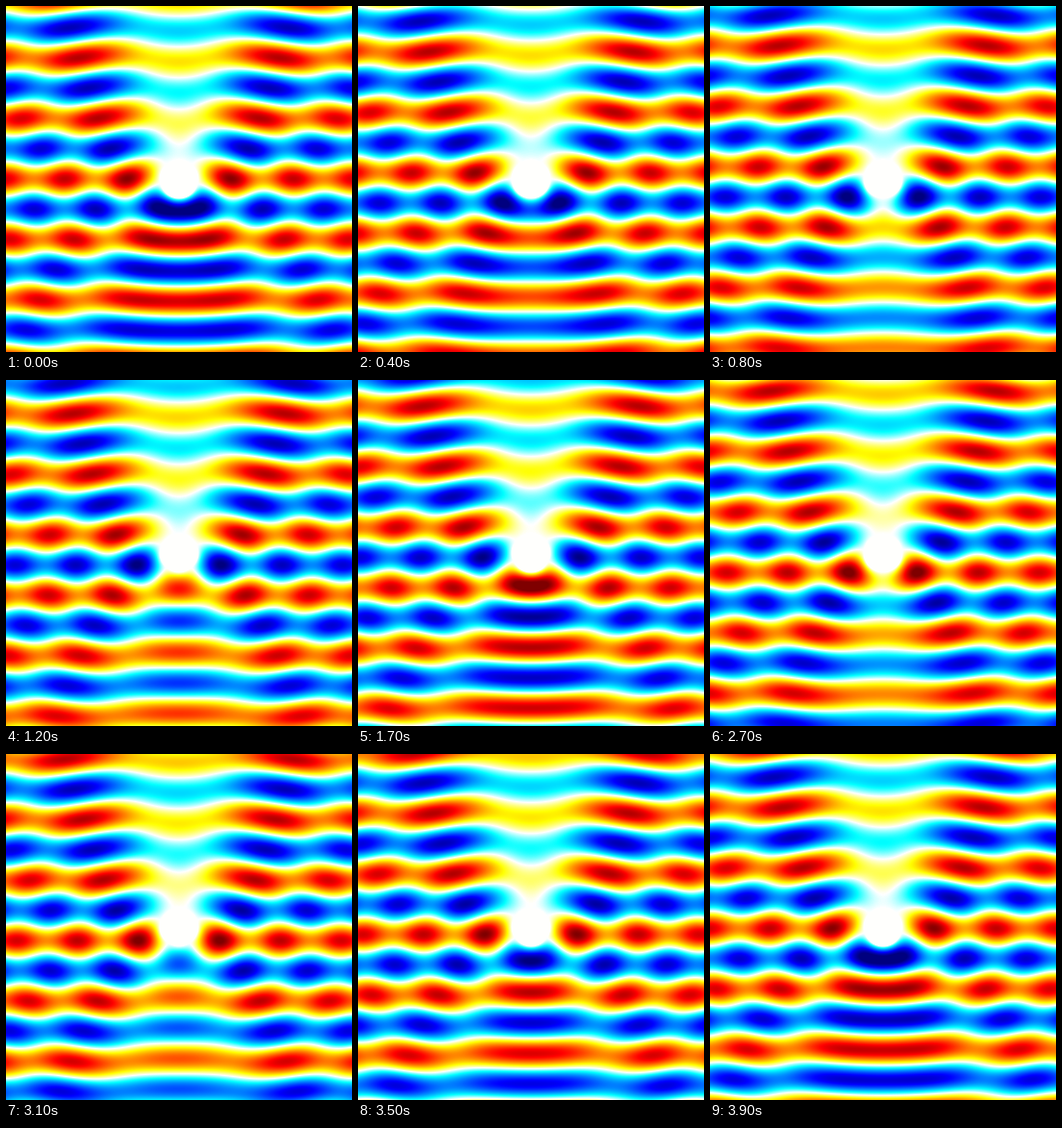
A matplotlib script for the animation above (4 s loop, 360x360 px).

```python
"""Plane wave travelling upwards and scattering off a soft disk."""
import numpy as np
import matplotlib.pyplot as plt
from matplotlib.animation import FuncAnimation
from matplotlib.colors import LinearSegmentedColormap

SIZE = 360        # stage in pixels
SCALE = 10        # pixels per unit length, wavenumber is 1
RADIUS = 2.0
FRAMES = 40
ORDERS = 14       # terms kept in the scattered wave
LIMIT = 1.5       # field value at the ends of the colour scale


def bessel_j(count, x):
    """J_0 .. J_(count-1) at the points x, from Bessel's integral."""
    tau = np.arange(128) * 2 * np.pi / 128
    phase = np.outer(x, np.sin(tau))
    return np.array([np.cos(n * tau - phase).mean(axis=1) for n in range(count)])


def hankel(count, x):
    """Outgoing Hankel functions H_0 .. H_(count-1) at the points x."""
    j = bessel_j(60, x)
    log = np.log(x / 2) + np.euler_gamma
    s0 = sum((-1) ** k * 2 / k * j[2 * k] for k in range(1, 29))
    s1 = sum((-1) ** k * (2 * k + 1) / (k * (k + 1)) * j[2 * k + 1]
             for k in range(1, 29))
    y = [2 / np.pi * (log * j[0] - s0),
         2 / np.pi * ((log - 1) * j[1] - j[0] / x - s1)]
    for n in range(1, count - 1):
        y.append(2 * n / x * y[n] - y[n - 1])
    return j[:count] + 1j * np.array(y)


def total_field():
    """Complex amplitude of incident plus scattered wave on the pixel grid."""
    axis = (np.arange(SIZE) - (SIZE - 1) / 2) / SCALE
    x, y = np.meshgrid(axis, -axis)
    r = np.hypot(x, y)
    angle = np.arctan2(x, y)          # measured from the upward direction

    radii = np.linspace(RADIUS, 26, 1600)
    h = hankel(ORDERS, radii)
    field = np.exp(1j * y)
    for n in range(ORDERS):
        weight = (1 if n == 0 else 2) * 1j ** n
        radial = h[n].real[0] / h[n][0] * h[n]
        field -= weight * np.interp(r, radii, radial) * np.cos(n * angle)
    field[r < RADIUS] = 0
    return field


cmap = LinearSegmentedColormap.from_list("wave", [
    (0, (0, 0, 0.5)), (0.125, (0, 0, 1)), (0.375, (0, 1, 1)),
    (0.5, (1, 1, 1)),
    (0.625, (1, 1, 0)), (0.875, (1, 0, 0)), (1, (0.5, 0, 0))], N=512)

field = total_field()
fig = plt.figure(figsize=(SIZE / 100, SIZE / 100), dpi=100)
ax = fig.add_axes([0, 0, 1, 1])
ax.axis("off")
image = ax.imshow(field.real, cmap=cmap, vmin=-LIMIT, vmax=LIMIT,
                  interpolation="nearest", aspect="auto")


def update(i):
    image.set_data((field * np.exp(-2j * np.pi * i / FRAMES)).real)
    return [image]


anim = FuncAnimation(fig, update, frames=FRAMES, interval=100,
                     repeat=True, repeat_delay=0, blit=False)
plt.show()
```
